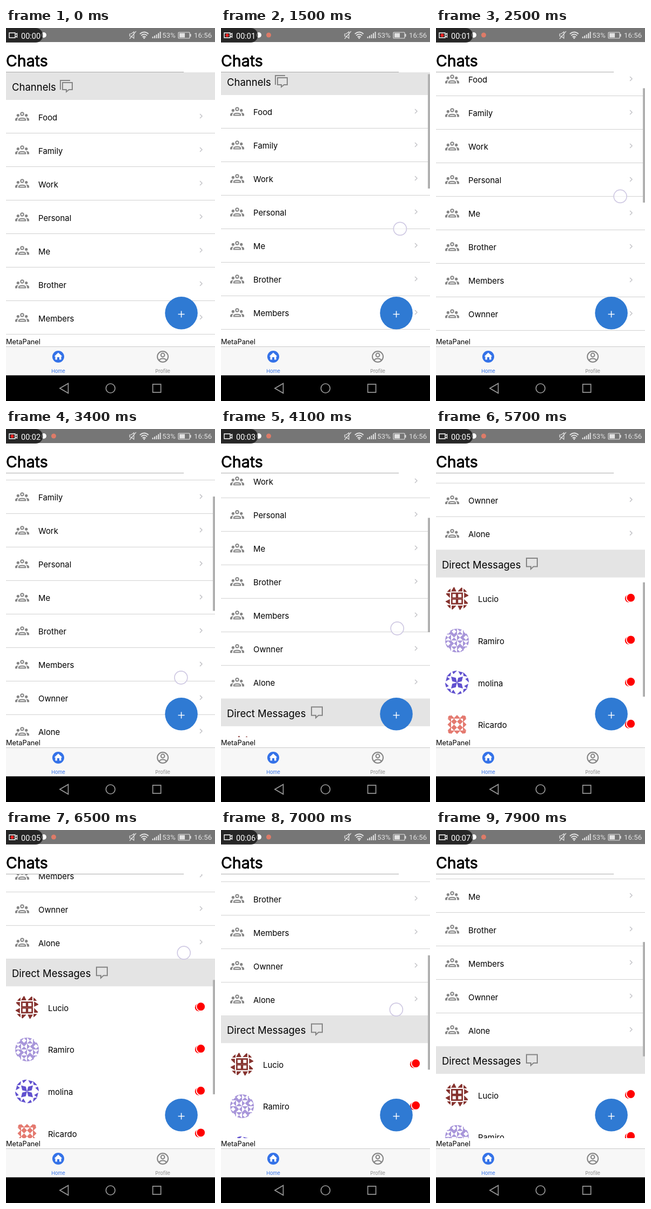
Write an HTML page that moves like this. It is 388x690 px and loops after 8 s.

```html
<!DOCTYPE html>
<html lang="en">
<head>
<meta charset="utf-8">
<title>Chats</title>
<style>
  html, body { margin: 0; width: 100%; height: 100%; overflow: hidden; background: #fff; }
  svg { display: block; width: 100%; height: 100%; font-family: Inter, "Noto Sans", sans-serif; }
  .line { fill: none; stroke: #858585; stroke-width: 2; }
  .status { fill: none; stroke: #e2e2e2; stroke-width: 1.2; }
  .digits { font-family: Roboto, sans-serif; }
  .nav { fill: none; stroke: #999; stroke-width: 1.7; }
</style>
</head>
<body>
<svg viewBox="0 0 388 690">
  <defs>
    <clipPath id="viewport"><rect y="82" width="388" height="488"/></clipPath>
    <clipPath id="round"><circle r="22"/></clipPath>
    <g id="group">
      <circle class="line" cx="30" cy="27" r="2.7" stroke-width="2.3"/>
      <path class="line" d="M23.8 38.5v-1q0-2.800 6.200-2.800t6.200 2.800v1z" stroke-width="2.2"/>
      <g fill="#858585">
        <circle cx="22.300" cy="29.500" r="2.600"/><circle cx="37.700" cy="29.500" r="2.600"/>
        <path d="M17 39.500v-2.500q0-3 6.500-3.700-2.600 1.700-2.600 4v2.200zM43 39.500v-2.500q0-3-6.500-3.700 2.600 1.700 2.600 4v2.200z"/>
      </g>
    </g>
    <path id="bubble" class="line" d="M1 1H21V16.500H14L9 21V16.500H1Z"/>
    <g id="badge">
      <circle cx="358" cy="1" r="7.2" fill="#f00"/>
      <circle cx="361.2" cy="-.2" r="8.6" fill="#fff"/>
      <circle cx="361.700" cy="-.5" r="7.400" fill="#f00"/>
    </g>
  </defs>
  <rect width="388" height="690" fill="#fff"/>

  <g clip-path="url(#viewport)"><g id="list"></g></g>
  <rect id="bar" x="384" width="4" height="211.5" fill="#b1b1b1"/>

  <text y="71" font-size="28.5" stroke="#000" stroke-width=".8">Chats</text>
  <path d="M0 81.5H330" stroke="#aaa"/>
  <text y="585" font-size="12.8">MetaPanel</text>

  <rect y="589" width="388" height="54" fill="#f7f7f7"/>
  <path d="M0 589.5H388" stroke="#c9c9c9"/>
  <circle cx="97" cy="608" r="11" fill="#3472e8"/>
  <path d="M97 600.5L89.5 607.5H91.5V613.5H95V609H99V613.5H102.5V607.5H104.5Z" fill="#fff"/>
  <g class="line">
    <circle cx="291" cy="608" r="10"/><circle cx="291" cy="605" r="3.4"/>
    <path d="M284 615q2-3.5 7-3.5t7 3.5"/>
  </g>
  <g font-size="9.2" text-anchor="middle">
    <text x="97" y="637.5" fill="#3472e8">Home</text>
    <text x="291" y="637.5" fill="#8c8c8c">Profile</text>
  </g>

  <circle cx="325.5" cy="527.2" r="30.3" fill="#2f7ad3"/>
  <path d="M319.5 529.5H331.5M325.5 523.5V535.5" stroke="#fff" stroke-width="1.5"/>

  <rect y="642.5" width="388" height="47.5" fill="#000"/>
  <g class="nav">
    <path d="M100 666.5L115.5 657.5V675.5Z"/>
    <circle cx="194" cy="666.5" r="8.5"/>
    <rect x="272.5" y="659" width="15" height="15"/>
  </g>

  <rect width="388" height="26" fill="#767676"/>
  <circle cx="70" cy="13" r="5" fill="#fff"/>
  <circle id="notice" cx="88.5" cy="13" r="4.5" fill="#dd7b68"/>
  <g class="status">
    <path d="M229.5 11H232L237.500 7V19L232 15H229.500ZM241.500 6L229.500 20"/>
    <path d="M248.500 11q8-7 16 0M251 14q5.500-5 11 0M253.500 17q3-3 6 0" stroke-width="1.800"/>
    <circle cx="256.500" cy="18.500" r="1"/>
    <path d="M272.500 19V16M276 19V14M279.500 19V12M283 19V9.500M286.500 19V7" stroke-width="2"/>
    <rect x="320" y="8" width="21" height="11" rx="1"/>
    <path d="M342.500 11V16" stroke-width="2"/>
    <path d="M322 13.500H332" stroke-width="8"/>
  </g>
  <g class="digits" font-size="13.3" fill="#e2e2e2">
    <text x="290" y="18">53%</text><text x="349" y="18">16:56</text>
  </g>
  <path d="M0 0H55a13.500 13.500 0 0 1 0 27H0Z" fill="#000" fill-opacity=".68"/>
  <path d="M6 9H17V18H6ZM17 12L20.500 10V17L17 15" fill="none" stroke="#fff" stroke-width="1.4"/>
  <circle id="rec" cx="11.500" cy="13.500" r="3" fill="#f22"/>
  <text id="clock" class="digits" x="28" y="19.5" font-size="14.5" fill="#fff">00:00</text>

  <circle id="touch" r="12" fill="#fff" fill-opacity=".6" stroke="#cfc9e3" stroke-width="1.7"/>
</svg>
<script>
const $ = id => document.getElementById(id);
const LOOP = 8000, TOP = 82, ROW = 62, DIRECT_TOP = 690, CHAT = 77.7;
const channels = ['Food', 'Family', 'Work', 'Personal', 'Me', 'Brother', 'Members', 'Ownner', 'Alone'];

// One quarter of each badge pattern, on a 4 by 4 grid around the centre.
const chats = [
  ['Lucio', '#86332f', 'M-1.9-1.1L-1.1-1.9V-1.1ZM-1-1.2L-.5-2L-.1-1.2ZM.1-1.2L.9-2V-1.2ZM-1-1H0V0H-1ZM-.75-.75V-.2H-.2V-.75Z'],
  ['Ramiro', '#a896da', 'M-2-2H-1V-1H-2ZM-1.5-1.9L-1.9-1.5L-1.5-1.1L-1.1-1.5ZM-1-2H0V-1H-1ZM-.5-1.9L-.9-1.5L-.5-1.1L-.1-1.5ZM0-2H1L.5-1.5ZM0-1H1L.5-1.5ZM-1-1H0L-.5-.5ZM-1 0H0L-.5-.5Z'],
  ['molina', '#6151cf', 'M-1.8-1L-1-1.8L-1.1-1.1ZM-.9-2H0L-.6-1.4ZM.2-1.9L1-1.7L.6-1.2ZM-1-1L-.2-.8L0 0L-.8-.2Z'],
  ['Ricardo', '#e47a70', 'M-1.5-1.5H-1V-1H-1.5ZM-1-1.6L-.5-1.1L0-1.6V-1H-1ZM0-1.6L.5-1.1L1-1.6V-1H0ZM-1-.5L-.5-1L0-.5L-.5 0Z']
];

const label = (text, x, y, size) => `<text x="${x}" y="${y}" font-size="${size}">${text}</text>`;
const header = (text, y) =>
  `<rect y="${y}" width="388" height="51" fill="#e4e4e4"/>` + label(text, 11, y + 34, 18.5);

function channelRow(name, i) {
  return `<g transform="translate(0 ${132 + ROW * i})">
    <path d="M0 62.5H388" stroke="#d0d0d0"/><use href="#group"/>${label(name, 60, 38.5, 14.9)}
    <path d="M360 27L364 31L360 35" fill="none" stroke="#c4c4c8" stroke-width="1.5"/></g>`;
}

function chatRow([name, color, quarter], i) {
  const turns = [0, 90, 180, 270].map(a => `<path d="${quarter}" transform="rotate(${a}) scale(11)"/>`);
  return `<g transform="translate(0 ${DIRECT_TOP + 90 + CHAT * i})">
    <g transform="translate(39 0)"><g clip-path="url(#round)" fill="${color}" fill-rule="evenodd">${turns.join('')}</g></g>
    ${label(name, 78, 6.5, 14.9)}<use href="#badge" y="-1"/></g>`;
}

$('list').innerHTML = channels.map(channelRow).join('') +
  header('Channels', TOP) +
  '<path class="line" d="M101 114V97H119M105 101H123V114H117L112 118V114H105Z"/>' +
  header('Direct Messages', DIRECT_TOP) +
  `<use href="#bubble" x="167" y="${DIRECT_TOP + 14.5}"/>` +
  chats.map(chatRow).join('');

// [time, scroll offset]
const scrollKeys = [[0, 0], [1350, 0], [1500, 9], [2500, 69], [2650, 74], [3200, 74], [4100, 191],
  [4400, 245], [4650, 285], [4750, 290], [5000, 355], [5400, 425], [5800, 480], [6150, 490],
  [6500, 452], [7200, 305], [7500, 290], [LOOP, 290]];

// The finger moves with the list, so its y plus the scroll offset stays constant.
const drags = [
  { from: 1000, to: 2600, sum: 380.5, x0: 327.5, x1: 343 },
  { from: 3150, to: 4350, sum: 560, x0: 324, x1: 328 },
  { from: 4700, to: 5400, sum: 652, x0: 330, x1: 335 },
  { from: 6200, to: 7250, sum: 679, x0: 333, x1: 323 }
];

const mix = (a, b, p) => a + (b - a) * p;

function scrollAt(t) {
  const i = scrollKeys.findIndex(key => key[0] > t);
  const [t0, s0] = scrollKeys[i - 1], [t1, s1] = scrollKeys[i];
  return mix(s0, s1, (t - t0) / (t1 - t0));
}

const show = (id, on) => $(id).setAttribute('visibility', on ? 'visible' : 'hidden');

function draw(now) {
  const t = now % LOOP;
  const scroll = scrollAt(t);
  $('list').setAttribute('transform', `translate(0 ${-scroll})`);
  $('bar').setAttribute('y', 81.5 + scroll * 0.4335);
  show('bar', t >= 1350);

  const drag = drags.find(d => t >= d.from && t < d.to);
  show('touch', drag);
  if (drag) {
    $('touch').setAttribute('cx', mix(drag.x0, drag.x1, (t - drag.from) / (drag.to - drag.from)));
    $('touch').setAttribute('cy', drag.sum - scroll);
  }

  const seconds = t < 1500 ? 0 : Math.max(1, Math.floor((t - 600) / 1000));
  $('clock').textContent = '00:0' + seconds;
  show('rec', t < 2600 ? t >= 500 : (t - 600) % 1000 >= 550);
  show('notice', t >= 200);
  requestAnimationFrame(draw);
}
requestAnimationFrame(draw);
</script>
</body>
</html>
```
